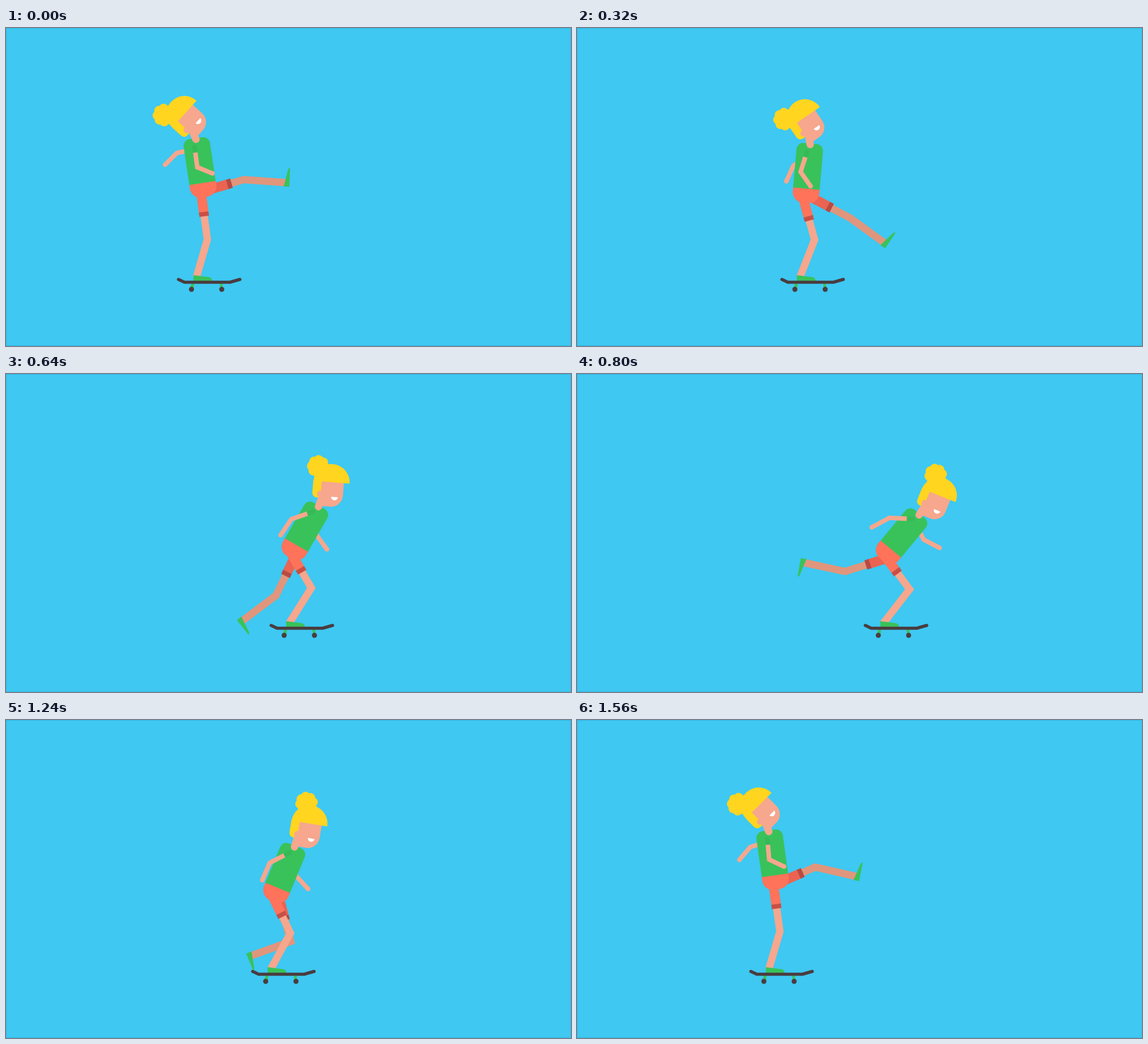
Animation of 998x561 px, one loop 1600 ms. Source, as an HTML page with a canvas:

```html
<!DOCTYPE html>
<html lang="en">
<head>
<meta charset="utf-8">
<title>Skateboarder</title>
<style>
  html, body { margin: 0; height: 100%; overflow: hidden; background: #3ec8f2; }
  canvas { display: block; }
</style>
</head>
<body>
<canvas id="stage" width="998" height="561"></canvas>
<script>
const ctx = document.getElementById('stage').getContext('2d');
const LOOP = 1600, PUSH = 960, STEP = 40;
const RAD = Math.PI / 180;
const C = {
  sky: '#3ec8f2', edge: '#38b3db', hair: '#ffd520', skin: '#f6a78d', farSkin: '#e0967c',
  shirt: '#39c25a', sleeve: '#37b957', shorts: '#ff735b', farShorts: '#eb6452',
  cuff: '#c94f45', farCuff: '#b94a43', board: '#4a3c3f', teeth: '#fff'
};

const smooth = u => u * u * (3 - 2 * u);
const mix = (a, b, u) => a + (b - a) * u;

// Eased 0 → 1 during the push, back to 0 for the rest of the loop
function swing(t) {
  t = (t + LOOP) % LOOP;
  return t < PUSH ? smooth(t / PUSH) : 1 - smooth((t - PUSH) / (LOOP - PUSH));
}

// Smooth looping curve through a few [time, value] points
function track(t, points) {
  const n = points.length;
  const point = k => {
    const turn = Math.floor(k / n), [time, value] = points[k - turn * n];
    return [time + turn * LOOP, value];
  };
  let i = n - 1;
  while (points[i][0] > t) i--;
  const [a, b, c, d] = [i - 1, i, i + 1, i + 2].map(point);
  const slope = (p, q) => (q[1] - p[1]) / (q[0] - p[0]);
  const tangent = (p, q, r) =>
    mix(slope(p, q), slope(q, r), (q[0] - p[0]) / (r[0] - p[0]));
  const h = c[0] - b[0], u = (t - b[0]) / h;
  return mix(b[1], c[1], smooth(u)) +
    h * u * (1 - u) * (tangent(a, b, c) * (1 - u) - tangent(b, c, d) * u);
}

// The kicking leg, in degrees
const THIGH = [[0, -16], [320, 28], [640, 116], [980, 182], [1240, 75], [1500, -31]];
const SHIN = [[0, 4], [320, 36], [640, 143], [980, 220], [1240, 160]];

// Point (x, y) of a frame placed at o and turned by angle
function place(o, angle, x, y) {
  const c = Math.cos(angle * RAD), s = Math.sin(angle * RAD);
  return [o[0] + x * c - y * s, o[1] + x * s + y * c];
}
const reach = (o, angle, length) => place(o, angle, length, 0);

function line(color, width, points, cap = 'butt') {
  ctx.strokeStyle = color;
  ctx.lineWidth = width;
  ctx.lineCap = cap;
  ctx.lineJoin = cap === 'round' ? 'round' : 'miter';
  ctx.beginPath();
  points.forEach(p => ctx.lineTo(...p));
  ctx.stroke();
}

function dot(color, [x, y], r, end = 2 * Math.PI) {
  ctx.fillStyle = color;
  ctx.beginPath();
  ctx.arc(x, y, r, 0, end);
  ctx.fill();
}

function box(color, x, y, w, h, radii) {
  ctx.fillStyle = color;
  ctx.beginPath();
  ctx.roundRect(x, y, w, h, radii);
  ctx.fill();
}

function shape(color, path) {
  ctx.fillStyle = color;
  ctx.fill(new Path2D(path));
}

function inFrame([x, y], angle, draw) {
  ctx.save();
  ctx.translate(x, y);
  ctx.rotate(angle * RAD);
  draw();
  ctx.restore();
}

function shoe(ankle, angle, toe) {
  inFrame(ankle, angle, () =>
    shape(C.shirt, `M-7-4L20 ${toe}Q26 ${toe + 1} 26 6L-7 6Z`));
}

function leg(hip, knee, ankle, skin, shorts, cuff) {
  const angle = Math.atan2(knee[1] - hip[1], knee[0] - hip[0]) / RAD;
  const hem = reach(hip, angle, 35.5);
  line(skin, 13, [hip, knee, ankle]);
  line(shorts, 17, [hip, hem]);
  line(cuff, 17, [hem, reach(hip, angle, 43.5)]);
}

function arm(shoulder, upper, fore, upperLength, foreLength, sleeve) {
  const elbow = reach(shoulder, upper, upperLength);
  const hand = reach(elbow, fore, foreLength);
  const start = reach(shoulder, upper, 10);
  if (sleeve) line(sleeve, 8, [shoulder, start], 'round');
  line(C.skin, 8, [start, elbow, hand]);
  dot(C.skin, hand, 4);
}

function skateboard(x) {
  inFrame([x, 0], 0, () => {
    shape(C.shirt, 'M0 449H5L4 459H-2ZM49.5 449H55V459H51Z');
    dot(C.board, [0, 461], 4.5);
    dot(C.board, [53.5, 461], 4.5);
    line(C.board, 5.5, [[-23, 443.5], [-12.5, 448.5], [68, 448.5], [85.5, 443.5]], 'round');
  });
}

function head(neck, angle, bunAngle) {
  inFrame(neck, angle, () => {
    const bun = reach([19.5, -45], bunAngle - 90, 36.5);
    dot(C.hair, bun, 16);
    for (let a = 0; a < 360; a += 45) dot(C.hair, reach(bun, bunAngle + a, 11.5), 8.5);
    box(C.hair, -13, -46, 17, 30, [0, 0, 6, 8]);
    box(C.skin, 2, -46, 39.3, 44.3, [0, 0, 21, 0]);
    dot(C.skin, [1, -23], 5.5);
    shape(C.hair, 'M-12.7-45A32 32 0 0 1 51.3-45Z');
    dot(C.teeth, [26.7, -19.5], 6, Math.PI);
  });
}

function draw(t) {
  const s = swing(t), armSwing = swing(t - 20), drag = swing(t - 55);
  const x = mix(327.6, 548.6, s);
  const lean = mix(-8.5, 43.5, s);
  const waist = [x + 19.5 + 3 * s, 273.5 + 38 * s];
  const onBody = (px, py) => place(waist, lean, px, py);

  ctx.fillStyle = C.sky;
  ctx.fillRect(0, 0, 998, 561);
  ctx.strokeStyle = C.edge;
  ctx.lineWidth = 1;
  ctx.strokeRect(0.5, 0.5, 997, 560);

  arm(onBody(4, -62), mix(170, 46, drag), mix(138, 11, drag), 41 - 9 * s, 29.5 + 2 * s);

  // The raised thigh is foreshortened at the start of the push
  const shin = track(t, SHIN);
  const farHip = onBody(7.5, 13.5);
  const farKnee = reach(farHip, track(t, THIGH), 82 - 16 * (1 - s) ** 8);
  const farAnkle = reach(farKnee, shin, 75);
  leg(farHip, farKnee, farAnkle, C.farSkin, C.farShorts, C.farCuff);
  shoe(farAnkle, shin - 92, 2);

  const knee = [x + 28 + 26 * s + 5 * s ** 6, 373 + 8 * s * s];
  leg(onBody(-5, 15), knee, [x + 8.7, 440], C.skin, C.shorts, C.cuff);
  shoe([x + 10.5, 440], 0, -0.5);
  skateboard(x);

  inFrame(waist, lean, () => {
    box(C.shorts, -23.5, -1, 47, 26, [0, 0, 18, 18]);
    box(C.shirt, -23.5, -80, 47, 80, [12, 12, 0, 0]);
  });

  const neck = onBody(0, -78);
  const headAngle = mix(-49.5, 32.5, drag);
  const bunAngle = -38 - 23 * Math.cos((t - 320) / LOOP * 2 * Math.PI);
  head(neck, headAngle, bunAngle);
  line(C.skin, 13, [neck, reach(neck, mix(lean, headAngle, 0.4) - 90, 14)], 'round');
  arm(onBody(-4.5, -65), mix(82, 193, armSwing), mix(22, 165, armSwing),
    36 + 5 * s, 29 + 7 * s, C.sleeve);
}

function tick() {
  draw(Math.floor(performance.now() % LOOP / STEP) * STEP);
  requestAnimationFrame(tick);
}
tick();
</script>
</body>
</html>
```
